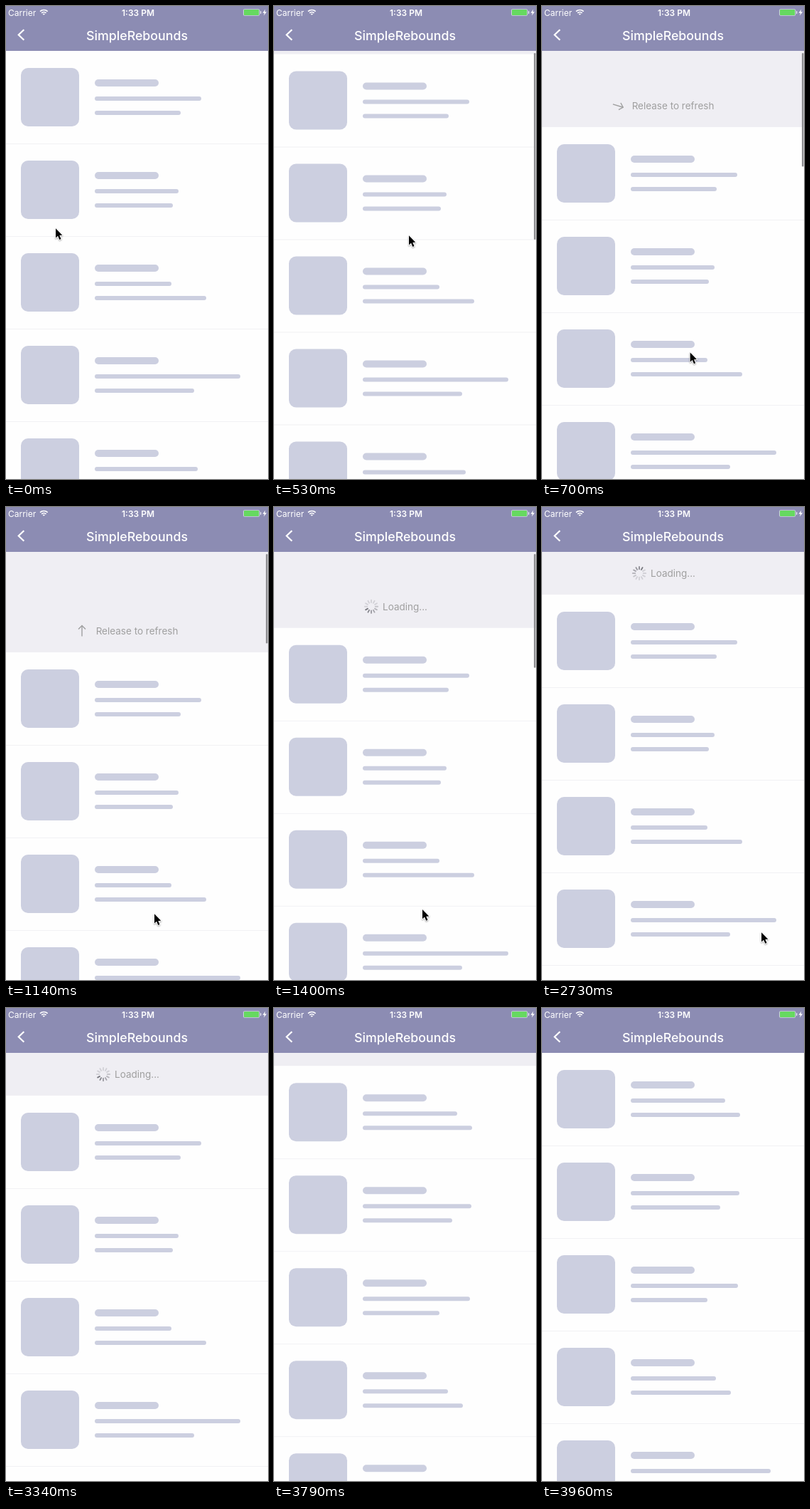
An HTML page with a canvas for the animation above (4120 ms loop, 369 by 664 pixels).

```html
<!DOCTYPE html>
<html lang="en">
<head>
<meta charset="utf-8">
<title>Pull to refresh</title>
<style>
  html, body { margin: 0; width: 100%; height: 100%; overflow: hidden; background: #fefefe; }
  canvas { display: block; }
</style>
</head>
<body>
<canvas id="stage" width="369" height="664"></canvas>
<script>
const ctx = document.getElementById('stage').getContext('2d');
const WIDTH = 369, HEIGHT = 664, NAV = 63, ROW = 130, HEADER = 60;
const LOOP = 4120, TICK = 88, LAST_TICK = 45;
const GRAB = 528, DRAG_END = 1144, RELEASE = 1190, REST = 2024, LEAVE = 2330, GONE = 2920;
const RELOAD = 3600, SETTLE = 290;
const GRAY = '#9f9f9f', BLOCK = '#cccfe0';
const FONT = 'Inter, "Liberation Sans", sans-serif';

// Lengths of the thin bars in each row, before and after the reload
const OLD_ROWS = [[150, 121], [118, 110], [108, 157], [205, 140], [145]];
const NEW_ROWS = [[133, 154], [153, 126], [151, 108], [120, 141], [197]];

const progress = (t, from, to) => Math.min(1, Math.max(0, (t - from) / (to - from)));
const smooth = p => p * p * (3 - 2 * p);
const easeOut = (p, power) => 1 - (1 - p) ** power;
const rubberBand = p => 1.56 * p / (1 + 0.56 * p);

const dragAt = t => easeOut(progress(t, GRAB, DRAG_END), 3.2);

function offsetAt(t) {
  const pulled = 4.5 * progress(t, 440, GRAB) + 136.5 * rubberBand(dragAt(t));
  const back = smooth(progress(t, RELEASE, RELEASE + SETTLE));
  const closed = smooth(progress(t, RELOAD, RELOAD + SETTLE));
  return (pulled + (HEADER - pulled) * back) * (1 - closed);
}

// The pointer approaches, drags down, drifts up and leaves at the lower right
function pointerAt(t) {
  const approach = smooth(progress(t, 0, GRAB));
  const drift = smooth(progress(t, DRAG_END, REST));
  const leave = progress(t, LEAVE, GONE);
  return {
    x: 70 + 120 * approach + 19 * easeOut(progress(t, GRAB, DRAG_END), 12) + 120 * easeOut(leave, 1.6),
    y: 312 + 10 * approach + 249 * dragAt(t) - 61 * drift + 180 * leave ** 1.85
  };
}

function box(x, y, w, h, r, color) {
  ctx.fillStyle = color;
  ctx.beginPath();
  ctx.roundRect(x, y, w, h, r);
  ctx.fill();
}

function line(points, width, color) {
  ctx.strokeStyle = color;
  ctx.lineWidth = width;
  ctx.beginPath();
  points.forEach(([x, y]) => ctx.lineTo(x, y));
  ctx.stroke();
}

function polygon(points, color) {
  ctx.fillStyle = color;
  ctx.beginPath();
  points.forEach(([x, y]) => ctx.lineTo(x, y));
  ctx.fill();
}

function text(string, x, baseline, size, weight, color, align = 'center') {
  ctx.font = `${weight} ${size}px ${FONT}`;
  ctx.textAlign = align;
  ctx.fillStyle = color;
  ctx.fillText(string, x, baseline);
}

function drawArrow(y, turn) {
  ctx.save();
  ctx.translate(107, y);
  ctx.rotate(Math.PI * (1 - turn));
  line([[0, 7.5], [0, -7.5]], 1.4, GRAY);
  line([[-5, -2.5], [0, -7.5], [5, -2.5]], 1.4, GRAY);
  ctx.restore();
}

function drawSpinner(y, t) {
  const head = Math.floor(t * 0.012 + 4.3);
  ctx.save();
  ctx.translate(137, y);
  ctx.lineCap = 'round';
  for (let spoke = 0; spoke < 12; spoke++) {
    const age = (head - spoke) % 12;
    ctx.globalAlpha = Math.max(0.25, 1 - age * 0.13);
    line([[0, -5.7], [0, -9.2]], 1.8, '#7b7b82');
    ctx.rotate(Math.PI / 6);
  }
  ctx.restore();
}

function drawRefreshHeader(t, listTop) {
  const y = listTop - HEADER / 2;
  box(0, NAV, WIDTH, listTop - NAV, 0, '#efeef3');
  if (t < RELEASE) {
    drawArrow(y, smooth(progress(t, 595, 845)));
    text('Release to refresh', 184.5, y + 5, 13.5, 400, GRAY);
  } else {
    drawSpinner(y, t);
    text('Loading...', 184.5, y + 5, 13.5, 400, GRAY);
  }
}

function drawRows(rows, listTop) {
  rows.forEach((bars, i) => {
    const y = listTop + i * ROW;
    box(21, y + 24, 82, 82, 10, BLOCK);
    box(125, y + 40, 90, 10, 5, BLOCK);
    bars.forEach((length, j) => box(125, y + 64 + 20 * j, length, 6, 3, BLOCK));
    box(0, y + ROW, WIDTH, 1, 0, '#f1f1f4');
  });
}

function drawScrollbar(t, offset) {
  ctx.globalAlpha = progress(t, 440, 510) * (1 - progress(t, 1420, 1640));
  box(366, 66, 2.5, 266.5 - offset, 1.2, '#8f8f92');
  ctx.globalAlpha = 1;
}

function drawNavigation() {
  box(0, 0, WIDTH, NAV, 0, '#8c8cb3');
  text('Carrier', 3, 13.5, 12, 400, '#fff', 'left');
  text('1:33 PM', 186, 13.5, 12, 600, '#fff');
  text('SimpleRebounds', 184.5, 47.5, 17.8, 500, '#fff');
  line([[25.3, 33.2], [17.7, 40.5], [25.3, 47.8]], 2.2, '#fff');

  ctx.lineWidth = 1.7;
  for (let radius = 1.5; radius < 8; radius += 3) {
    ctx.beginPath();
    ctx.arc(53.3, 13, radius, -Math.PI * 0.75, -Math.PI * 0.25);
    ctx.stroke();
  }

  box(334, 4.2, 23.3, 9.6, 2, '#cfcfe2');
  box(335, 5, 21.3, 8, 1, '#66d960');
  box(358, 7, 1.4, 4, 0.7, '#e4e4ef');
  polygon([[365.3, 4.5], [361.5, 9.7], [364, 9.7], [363, 13.5], [367, 8.2], [364.4, 8.2]], '#fff');
}

function drawPointer({ x, y }) {
  const shape = [[0, 0], [0, 14], [3.2, 11.1], [5.6, 16.5], [7.9, 15.5], [5.6, 10.2], [9.8, 10]];
  ctx.save();
  ctx.translate(x, y + 0.3);
  ctx.scale(0.95, 0.95);
  ctx.lineJoin = 'round';
  ctx.shadowColor = 'rgba(0, 0, 0, 0.35)';
  ctx.shadowBlur = 2;
  ctx.shadowOffsetY = 1;
  line([...shape, shape[0]], 2, '#fff');
  ctx.shadowColor = 'transparent';
  polygon(shape, '#000');
  ctx.restore();
}

function draw(t) {
  const offset = offsetAt(t), listTop = NAV + offset;
  box(0, 0, WIDTH, HEIGHT, 0, '#fefefe');
  drawRefreshHeader(t, listTop);
  drawRows(t < RELOAD ? OLD_ROWS : NEW_ROWS, listTop);
  drawScrollbar(t, offset);
  drawNavigation();
  drawPointer(pointerAt(t));
}

const start = performance.now();
function play(now) {
  const time = Math.max(0, now - start) % LOOP;
  // The picture advances in steady ticks and rests on the last one
  draw(Math.min(LAST_TICK, Math.floor((time + 4) / TICK)) * TICK);
  requestAnimationFrame(play);
}
play(start);
</script>
</body>
</html>
```
